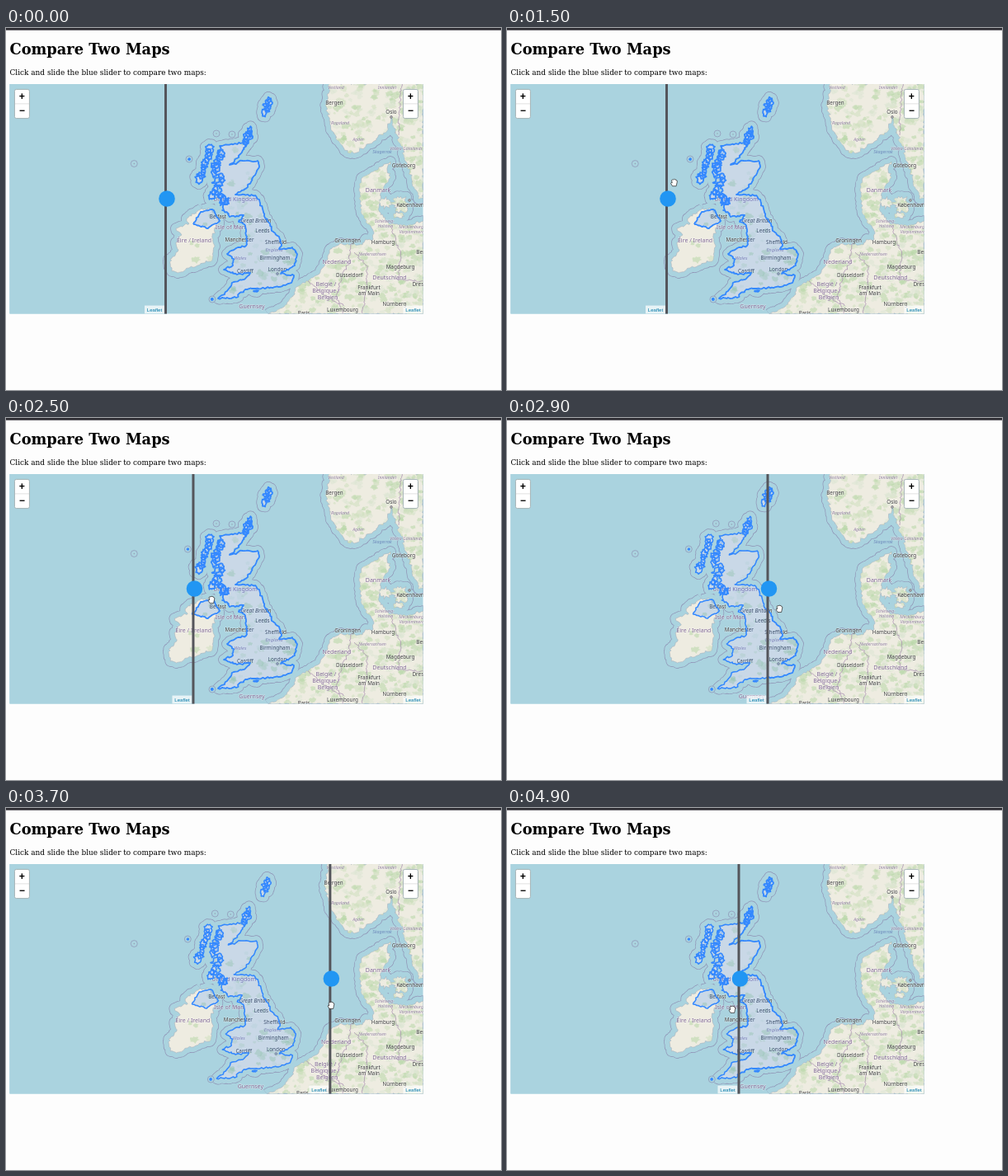
Recreate the animation shown at these times as an HTML page. Size 600x439 px, loop 5000 ms.

```html
<!DOCTYPE html>
<html lang="en">
<head>
<meta charset="utf-8">
<title>Compare Two Maps</title>
<style>
html, body { margin: 0; width: 100%; height: 100%; overflow: hidden; background: #fdfdfd; }
#stage { display: block; width: 600px; height: 439px; }
.page { font-family: "DejaVu Serif", serif; fill: #000; }
.label { font-family: "Noto Sans", "Open Sans", sans-serif; text-anchor: middle; fill: #3a3a3a;
  stroke: #fff; stroke-opacity: .5; stroke-width: 1; paint-order: stroke; stroke-linejoin: round; }
.country { fill: #7f6592; }
.region { fill: #8d7a9c; font-style: italic; stroke-opacity: .35; }
.water { fill: #6c87ba; font-style: italic; stroke: none; }
.isle { font-style: italic; }
.attr { font: 6.12px "Liberation Sans", Arial, sans-serif; fill: #0078a8; }
.zoom { font: bold 12px "Liberation Mono", monospace; text-anchor: middle; fill: #000; }
.land { fill: #eeece1; stroke: #a3a9b4; stroke-width: .5; }
.limit { fill: none; stroke: #8f93b5; stroke-width: 13.6; stroke-linejoin: round; }
.sea { fill: none; stroke: #aad3df; stroke-width: 12.2; stroke-linejoin: round; }
.border { fill: none; stroke: #a88db0; stroke-width: .9; stroke-opacity: .8; }
.uk { fill: #3388ff; fill-opacity: .2; stroke: #3388ff; stroke-linejoin: round; }
</style>
</head>
<body>
<svg id="stage" viewBox="0 0 600 439">
  <defs>
    <g id="base"></g>
    <g id="area"></g>
    <g id="zoom">
      <rect x=".4" y=".4" width="18" height="35.2" rx="2.2" fill="#fff" stroke="#a5b3b6"/>
      <path d="M1 17.9H18" stroke="#ccc" stroke-width=".6"/>
      <text class="zoom" x="9.4" y="13">+</text>
      <text class="zoom" x="9.4" y="30">−</text>
    </g>
    <g id="tag">
      <rect width="24" height="10" fill="#fff" fill-opacity=".72"/>
      <text class="attr" x="2.8" y="7.2">Leaflet</text>
    </g>
  </defs>
  <rect width="600" height="439" fill="#fdfdfd"/>
  <rect width="600" height="2.7" fill="#2d2c32"/>
  <text class="page" x="4.5" y="32" font-size="17.81" font-weight="bold">Compare Two Maps</text>
  <text class="page" x="4.5" y="56.8" font-size="8.93">Click and slide the blue slider to compare two maps:</text>

  <svg x="4.4" y="68" width="501.1" height="278.6" viewBox="4.4 68 501.1 278.6">
    <use href="#base"/>
    <use href="#area" stroke-width="1.8"/>
    <use href="#tag" x="481.5" y="336.6"/>
  </svg>
  <svg id="left" x="4.4" y="68" height="278.6">
    <g transform="translate(-4.4 -68)">
      <use href="#base" x="-1.7"/>
      <use href="#area" x="-1.7" stroke-width="1.5"/>
      <use id="leftTag" href="#tag" y="336.6"/>
    </g>
  </svg>
  <use href="#zoom" x="10" y="74"/>
  <use href="#zoom" x="481" y="74"/>
  <g id="slider">
    <rect x="-1.5" y="68" width="3" height="278.6" fill="#54555b"/>
    <circle cx="1.5" cy="207" r="9.8" fill="#2196f3"/>
  </g>
  <g id="cursor" stroke="#222" stroke-width=".7" stroke-linejoin="round" fill="#fff">
    <path id="arrow" d="M0 0V9L2 7L4 10L5 9L4 6H6Z"/>
    <path id="hand" d="M-2 4.5L-4 1Q-3.4 -.4 -2.3 .7L-3 -2.6Q-2 -4 -1 -3Q0 -5 1 -3.4Q2.4 -4.2 2.6 -2.4Q4 -2.6 3.8 -1L2.6 4.5Z"/>
    <path id="resize" d="M-6 0L-2.6 -3V-1H2.6V-3L6 0L2.6 3V1H-2.6V3Z"/>
  </g>
</svg>
<script>
const $ = id => document.getElementById(id);
const lerp = (a, b, f) => a + (b - a) * f;

let seed = 11;
const rand = () => (seed = (seed * 16807) % 2147483647) / 2147483647;
const spread = a => (rand() - .5) * 2 * a;

// Line through a few points, roughened in between
function coast(text, rough = 1, closed = true) {
  const pts = text.trim().split(/\s+/).map(p => p.split(',').map(Number));
  if (closed) pts.push(pts[0]);
  const out = [pts[0]];
  for (let i = 1; i < pts.length; i++) {
    const [x, y] = pts[i - 1], [u, v] = pts[i];
    const steps = Math.ceil(Math.hypot(u - x, v - y) / 2.4);
    for (let k = 1; k <= steps; k++) {
      const a = k < steps ? rough : 0;
      out.push([lerp(x, u, k / steps) + spread(a), lerp(y, v, k / steps) + spread(a)]);
    }
  }
  return 'M' + out.map(p => p.map(c => c.toFixed(1)).join(' ')).join('L');
}

// Ragged blob
function isle(cx, cy, rx, ry = rx) {
  const n = 7 + Math.round(rx + ry);
  let d = '';
  for (let i = 0; i < n; i++) {
    const a = i / n * 2 * Math.PI, r = .55 + rand() * .6;
    d += (i ? 'L' : 'M') + (cx + Math.cos(a) * rx * r).toFixed(1) + ' ' + (cy + Math.sin(a) * ry * r).toFixed(1);
  }
  return d + 'Z';
}

// Islands strewn from one point to another
function chain(x, y, u, v, n, r) {
  let d = '';
  for (let i = 0; i < n; i++) {
    const f = i / (n - 1);
    d += isle(lerp(x, u, f) + spread(r * .5), lerp(y, v, f), r * (.6 + rand() * .7), r * (.7 + rand() * .8));
  }
  return d;
}

const path = (cls, d) => `<path class="${cls}" d="${d}"/>`;

const britain = coast(`262,143 294,138 280,158 271,166 287,161 305,161 307,168 293,193 278,202 302,203 307,208 313,228
    320,237 322,246 331,253 334,263 331,268 347,266 353,274 350,288 333,298 349,300 346,309 330,314 303,316 290,317
    279,327 257,328 268,319 276,308 290,304 296,297 280,299 264,293 275,288 276,280 268,274 279,267 291,264 292,253
    289,238 282,235 288,227 271,229`, 1.1, false)
  + coast('271,229 262,221 270,206 260,215 257,203 261,195 250,188 258,181 252,168 260,164 255,157 262,143', 2.2, false).replace('M', 'L') + 'Z';
const ulster = coast('227,238 236,223 250,220 259,234 245,243');
const ireland = coast('237,219 219,231 222,237 206,243 213,251 206,260 209,269 199,280 201,295 208,297 250,281 253,265 250,252 258,235 250,220', 1.4);
const continent = coast(`318,347 337,338 350,323 352,314 380,298 390,280 393,268 404,262 432,263 436,256 444,258 446,248
  431,225 428,195 431,182 447,173 466,162 462,172 466,181 454,200 452,222 464,237 485,240 506,234 506,347`, 1.2);
const nordic = coast('392,67 388,95 397,128 410,147 422,152 444,139 463,122 467,106 470,121 479,143 487,168 500,207 506,206 506,67', 1.9);
const danish = isle(460, 212, 7) + isle(478, 213, 11) + isle(476, 227, 8, 4);
const islands = chain(319, 87, 314, 103, 6, 4) + chain(295, 125, 291, 138, 5, 4.2) + chain(248, 146, 236, 183, 9, 4.2)
  + chain(259, 152, 250, 176, 6, 4.5) + chain(262, 180, 249, 204, 6, 4) + chain(256, 200, 267, 211, 4, 3)
  + isle(303, 319, 3, 1);
const lands = [britain, ireland, continent, nordic, danish, islands];

// Greenery grows denser towards the south and east
function greenery() {
  const tones = ['#cfe0bf', '#b9d8a8', '#dde5d3'];
  let s = '';
  for (let i = 0; i < 1100; i++) {
    const x = lerp(200, 512, Math.pow(rand(), .45)), y = lerp(66, 348, rand()), r = 2 + rand() * 4;
    s += `<path d="${isle(x, y, r, r * .8)}" fill="${tones[i % 3]}"/>`;
  }
  return `<g fill-opacity=".55">${s}</g>`;
}

const speck = (x, y) => `<circle cx="${x}" cy="${y}" r="4" fill="#aad3df" stroke="#8f93b5" stroke-width=".7"/>`
  + `<circle cx="${x}" cy="${y}" r=".7" fill="#8f9dad"/>`;
const specks = speck(157, 164.5) + speck(222, 159) + speck(255, 128) + speck(274, 129) + speck(250, 329);

const borders = ['476,130 476,103 480,67', '419,261 416,284 406,302 401,327 408,347', '366,307 384,323 409,337',
  '467,240 479,278 475,306 506,307', '422,272 437,288 438,314 432,346'
].map(s => path('border', coast(s, 1.5, false))).join('');

const text = (cls, size, list) => list.map(([s, x, y]) =>
  `<text class="label ${cls}" font-size="${size}" x="${x}" y="${y + size * .36}">${s}</text>`).join('');
const labels =
  text('region', 5.2, [['Vestland', 400, 72], ['Innlandet', 462, 72], ['Rogaland', 405, 115], ['Agder', 427, 135],
    ['Västra Götalands', 485, 146], ['Schleswig-', 459, 234], ['Holstein', 460, 240],
    ['Mecklenburg-', 492, 241], ['Vorpommern', 492, 247], ['Niedersachsen', 444, 274]]) +
  text('water', 5.2, [['Skagerrak', 456, 150]]) +
  text('country', 7, [['United Kingdom', 278, 207], ['Éire / Ireland', 228, 257.5], ['Isle of Man', 272, 241.5],
    ['Guernsey', 298, 337], ['Danmark', 451, 196], ['Nederland', 401, 283], ['Deutschland', 465, 302],
    ['België /', 388, 310], ['Belgique /', 388, 318], ['Belgien', 390, 326]]) +
  text('region', 5.8, [['England', 325, 269], ['Wales', 284, 279]]) +
  text('isle', 6.5, [['Great Britain', 303, 234]]) +
  text('', 6.3, [['Bergen', 398, 91], ['Oslo', 467, 102], ['Göteborg', 482, 167], ['København', 490, 215], ['Hamburg', 457, 260],
    ['Groningen', 414, 258], ['Düsseldorf', 416, 300], ['Magdeburg', 478, 290], ['Berlin', 506, 272], ['Frankfurt', 440, 315],
    ['am Main', 440, 322], ['Dresden', 505, 311], ['Nürnberg', 471, 335], ['Luxembourg', 408, 342], ['Paris', 361, 345.5],
    ['Belfast', 257, 229], ['Leeds', 311, 246], ['Manchester', 283, 257], ['Sheffield', 327, 259.5],
    ['Birmingham', 326, 278.5], ['Cardiff', 290, 294.5], ['London', 329, 293]]);
const town = (x, y) => `<circle cx="${x}" cy="${y}" r="1.4" fill="#b9b6bf" stroke="#666" stroke-width=".6"/>`;

const each = cls => lands.map(d => path(cls, d)).join('');
$('base').innerHTML = '<rect y="66" width="510" height="284" fill="#aad3df"/>'
  + each('limit') + each('sea') + specks + each('land')
  + `<clipPath id="ground">${each('')}</clipPath><g clip-path="url(#ground)">${greenery()}</g>`
  + borders + town(329, 298) + town(467, 108) + town(489, 209) + labels;
$('area').innerHTML = [britain, ulster, islands, isle(222, 159, 1), isle(250, 329, 1.2)].map(d => path('uk', d)).join('');

// Pointer stops: ms, x, y
const stops = [[700, 592, 33], [900, 293, 72], [1800, 190, 212], [2100, 190, 212],
  [2900, 330, 231], [3700, 394, 239], [4400, 358, 244], [4900, 273, 244]];

const slope = (i, k) => (stops[i + 1][k] - stops[i][k]) / (stops[i + 1][0] - stops[i][0]);
function tangent(i, k) {
  if (i === 0 || i === stops.length - 1) return 0;
  const a = slope(i - 1, k), b = slope(i, k);
  return a * b > 0 ? 2 * a * b / (a + b) : 0;
}

// Monotone cubic through the stops
function pointer(t, k) {
  const last = stops.length - 1;
  t = Math.max(stops[0][0], Math.min(stops[last][0], t));
  const j = Math.max(1, stops.findIndex(s => s[0] >= t)), i = j - 1;
  const span = stops[j][0] - stops[i][0], u = (t - stops[i][0]) / span, w = 1 - u;
  return lerp(stops[i][k], stops[j][k], u * u * (3 - 2 * u))
    + span * u * w * (w * tangent(i, k) - u * tangent(j, k));
}

function draw(now) {
  const t = Math.floor(now % 5000 / 100) * 100;
  const x = pointer(t, 1), y = pointer(t, 2);
  // The slider trails the pointer by one step
  const s = t < 2100 ? 193.5 : Math.max(193.5, pointer(t - 100, 1) + .4);
  $('left').setAttribute('width', s - 4.4);
  $('leftTag').setAttribute('x', s - 25.5);
  $('slider').setAttribute('transform', `translate(${s} 0)`);
  $('cursor').setAttribute('transform', `translate(${x} ${y})`);
  const kind = x > 505 || y < 68 ? 'arrow' : Math.hypot(x - s - 1.5, y - 207) < 10 ? 'resize' : 'hand';
  for (const id of ['arrow', 'hand', 'resize'])
    $(id).style.display = t >= 700 && id === kind ? '' : 'none';
}

const start = performance.now();
function tick() {
  draw(performance.now() - start);
  requestAnimationFrame(tick);
}
tick();
</script>
</body>
</html>
```
